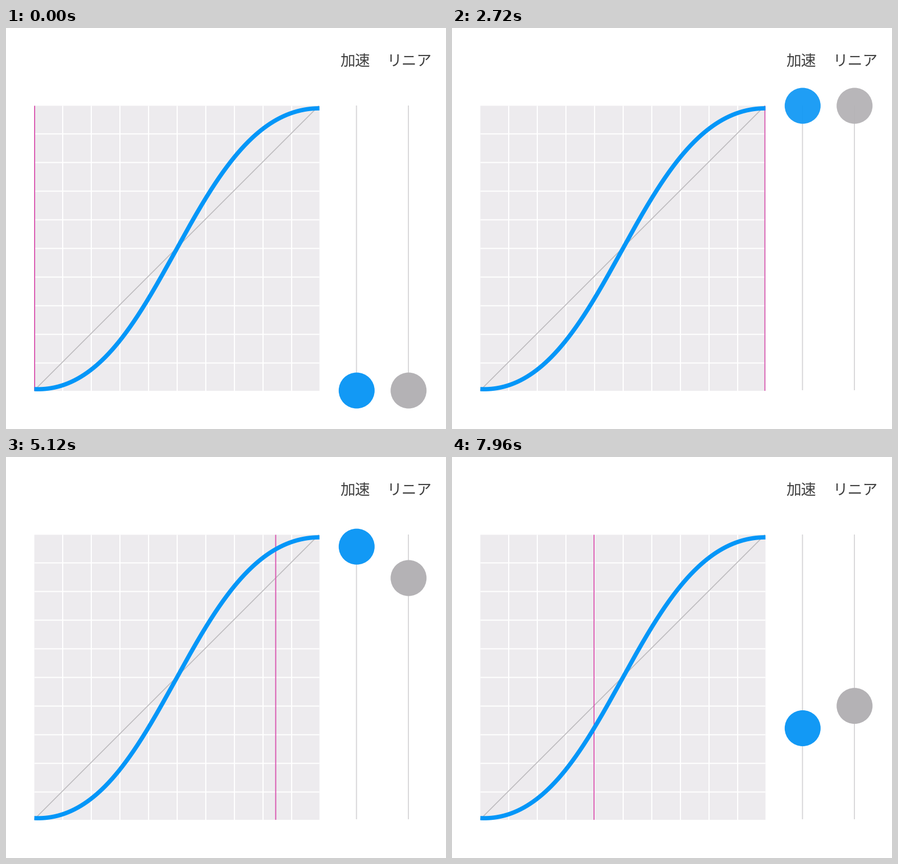
Animation, 784 px wide and 714 px high, one loop 8 s. Source, as a matplotlib script:

```python
import numpy as np
import matplotlib.pyplot as plt
from matplotlib.animation import FuncAnimation
from matplotlib.patches import Circle, Rectangle

W, H, DPI = 784, 714, 64
STEP, LOOP = 40, 8000
LEFT, RIGHT, TOP, BOTTOM = 50.5, 558.5, 138.5, 646

# Run starts in ms; the other times are measured from a start
STARTS = (1679, 4746, 7784)
MOVE = 441
OUT_AT, OUT_LEN = 1023, 336
IN_AT, IN_LEN = 1840, 340

BLUE, BALL_BLUE, GRAY = "#0396f8", "#1299f5", "#b4b2b5"
PINK = "#d957b0"


def px(v):
    return v * 72 / DPI


def bezier(s, p1, p2):
    return 3 * p1 * s * (1 - s) ** 2 + 3 * p2 * s**2 * (1 - s) + s**3


S = np.linspace(0, 1, 400)
EASE_X = bezier(S, 0.444, 0.544)
EASE_Y = bezier(S, -0.02, 1)


def ease(p):
    return np.interp(p, EASE_X, EASE_Y)


def ramp(t, start, length):
    return min(max((t - start) / length, 0), 1)


def state(t):
    """Progress along the time axis and opacity of the moving parts."""
    past = [s for s in STARTS if s <= t]
    if not past:
        return 0, 1
    t -= past[-1]
    if t >= IN_AT:
        return 0, ramp(t, IN_AT, IN_LEN)
    return ramp(t, 0, MOVE), 1 - ramp(t, OUT_AT, OUT_LEN)


fig = plt.figure(figsize=(W / DPI, H / DPI), dpi=DPI, facecolor="white")
ax = fig.add_axes([0, 0, 1, 1])
ax.set_xlim(0, W)
ax.set_ylim(H, 0)
ax.axis("off")


def line(x, y, color, width, z):
    return ax.plot(x, y, color=color, lw=px(width), zorder=z,
                   solid_capstyle="butt", snap=False)[0]


ax.add_patch(Rectangle((LEFT, TOP), RIGHT - LEFT, BOTTOM - TOP,
                       fc="#edebee", lw=0, zorder=1, snap=False))
for i in range(9):
    x, y = 101 + 51 * i, 188.5 + 51 * i
    line([x, x], [TOP, BOTTOM], "white", 2, 2)
    line([LEFT, RIGHT], [y, y], "white", 2, 2)
line([LEFT, 557.5], [645, TOP], "#bcbabd", 1.6, 3)
line(LEFT + (RIGHT - LEFT) * EASE_X, 643 - 500 * EASE_Y, BLUE, 7.6, 5)

for x, label, mid in ((624.5, "加速", 622.5), (717, "リニア", 718.3)):
    line([x, x], [138, 645], "#d5d4d6", 1.8, 2)
    ax.text(mid, 66.6, label, ha="center", va="baseline", color="#404040",
            family="Noto Sans CJK JP", size=px(26.7))

cursor = line([51, 51], [TOP, BOTTOM], PINK, 1.9, 4)
balls = [ax.add_patch(Circle((x, 645.5), 32, fc=c, lw=0, zorder=6))
         for x, c in ((624.8, BALL_BLUE), (717.3, GRAY))]


def draw(i):
    p, alpha = state(i * STEP)
    x = 51 + 506.5 * p
    cursor.set_xdata([x, x])
    for ball, q in zip(balls, (ease(p), p)):
        ball.center = (ball.center[0], 645.5 - 507 * q)
    for part in (cursor, *balls):
        part.set_alpha(alpha)
    return cursor, *balls


anim = FuncAnimation(fig, draw, frames=LOOP // STEP, interval=STEP,
                     init_func=lambda: draw(0), repeat=True, repeat_delay=0)
plt.show()
```
